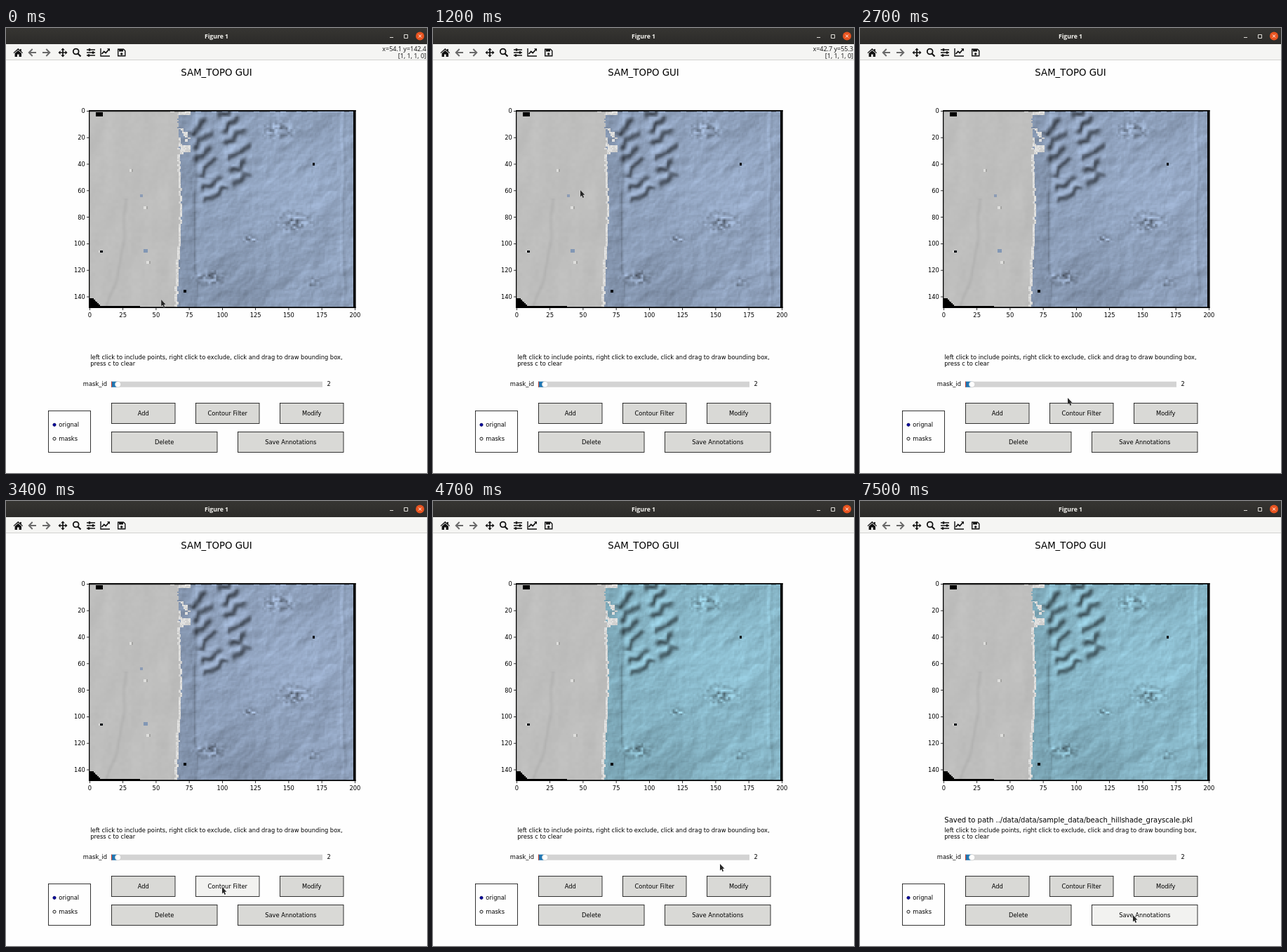
An HTML page with a canvas that plays this animation: 600x634 px, repeating every 8000 ms.

```html
<!DOCTYPE html>
<html lang="en">
<head>
<meta charset="utf-8">
<title>Figure 1</title>
<style>
  html, body { margin: 0; width: 100%; height: 100%; overflow: hidden; background: #fefefe; }
  canvas { display: block; }
</style>
</head>
<body>
<canvas id="stage" width="600" height="634"></canvas>
<script>
const LOOP = 8000, STEP = 100, FILTERED_AT = 3500, SAVED_AT = 7500;
const MAP = { x: 119, y: 118, w: 378, h: 280, cols: 200, rows: 148, scale: 1.89 };
const PLOT = '"DejaVu Sans", sans-serif', SYSTEM = '"Open Sans", sans-serif';
const BUTTON_ROWS = [['Add', 'Contour Filter', 'Modify'], ['Delete', 'Save Annotations']];

// pointer moves: start time, end time, destination
const HOME = [221.2, 387.1];
const MOVES = [
  [0, 500, 174, 290], [500, 1100, 199.7, 222.5], [1100, 1200, 210, 231],
  [1200, 1600, 156, 326], [1600, 1800, 172, 305], [1800, 2300, 238.5, 411],
  [2400, 2900, 307, 549], [3200, 3400, 308, 550], [4400, 4700, 409, 517], [5700, 6200, 389, 590]
];

// ---- terrain ----
const bump = d => Math.exp(-d * d);

function hash(x, y) {
  const s = Math.sin(x * 127.1 + y * 311.7) * 43758.5453;
  return s - Math.floor(s);
}
function noise(x, y) {
  const i = Math.floor(x), j = Math.floor(y), ease = v => v * v * (3 - 2 * v);
  const u = ease(x - i), v = ease(y - j), mix = (a, b, k) => a + (b - a) * k;
  return mix(mix(hash(i, j), hash(i + 1, j), u), mix(hash(i, j + 1), hash(i + 1, j + 1), u), v);
}
function height(x, y) {
  const across = x + y, along = x - y;
  return .9 * noise(across * .035, along * .025) + .5 * noise(across * .1 + 9, along * .07)
    + .4 * noise(x * .16, y * .2) + .2 * noise(x * .36, y * .4) + .1 * noise(x * .7, y * .7);
}
// parallel strokes stepping down the slope, in two columns
function gullyShade(x, y) {
  let shade = 0;
  for (let row = 0; row < 6; row++) for (let col = 0; col < 2; col++) {
    const dx = x - (77 + 2.2 * row + 22 * col), dy = y - (15 + 10.5 * row - 12 * col);
    const along = dx * .8 - dy * .6, length = 10 + 9 * hash(row, col + 4);
    const side = dx * .6 + dy * .8 + 5 * (noise(along * .2, row * 7 + col) - .5);
    const past = Math.max(-along, along - length, 0);
    const width = 1.6 + hash(row + 2, col);
    shade += bump(past / 3) * (.12 * bump((side + 4) / 3) - .5 * bump(side / width));
  }
  return shade;
}
function roughShade(x, y) {
  let shade = 0;
  for (const [cx, cy, r] of [[154, 83, 9], [143, 14, 8], [121, 96, 4], [168, 129, 4], [90, 125, 7]])
    shade += bump(Math.hypot((x - cx) / 1.4, (y - cy) * 1.3) / r) * .8 * (noise(x * .5, y * .55) - .58);
  return shade;
}
function hillShade(x, y) {
  const wander = 2 * noise(y * .06, 5);
  let s = 1 + .5 * (height(x + 1, y + 1) - height(x, y)) + gullyShade(x, y) + roughShade(x, y);
  s += .07 * bump(Math.hypot(x - 155, (y - 60) * 1.3) / 38) - .1 * bump(Math.hypot(x - 112, y - 138) / 26);
  if (x < 80) s -= .07;
  if (y > 25) s -= .12 * bump(x - 79 - wander);
  s += .06 * bump(x - 189 - wander) - .07 * bump(x - 191 - wander);
  return Math.max(.1, Math.min(1.22, s));
}
function sandShade(x, y) {
  const slope = noise((x + 1) * .1, (y + 1) * .05) - noise(x * .1, y * .05);
  const streak = x + 8 * noise(y * .04, 3) - (148 - y) * .18;
  return 1 + .2 * slope + .02 * (noise(x * .4, y * .4) - .5) - .05 * bump((streak - 17) / 1.4) * (y > 65);
}
function renderTerrain(tint, specks) {
  const layer = document.createElement('canvas');
  layer.width = MAP.cols; layer.height = MAP.rows;
  const g = layer.getContext('2d'), image = g.createImageData(MAP.cols, MAP.rows);
  for (let y = 0, k = 0; y < MAP.rows; y++) for (let x = 0; x < MAP.cols; x++, k += 4) {
    const edge = Math.round(66 + 3.7 * bump((y - 70) / 45) + .8 * (hash(3, y >> 1) - .5));
    const mottled = y < 33 && x < 76 && (y < 3 || (y > 12 && noise(x * .4, y * .5) > .58 + (x - 70) * .04));
    const inMask = x >= edge && !mottled;
    const color = inMask ? tint : [190, 190, 189];
    const rim = mottled ? x >= edge : x >= edge - 2 && y > 25;
    let s = inMask ? hillShade(x, y) : rim ? 1.08 + .13 * hash(x, y) : sandShade(x, y);
    if (y === 0) s *= x > 60 && hash(x >> 2, 1) > .45 ? 1.15 : .8;
    for (let c = 0; c < 3; c++) image.data[k + c] = color[c] * s;
    image.data[k + 3] = 255;
  }
  g.putImageData(image, 0, 0);
  const block = (fill, ...rect) => { g.fillStyle = fill; g.fillRect(...rect); };
  block('#000', 5, 1, 5, 3);
  for (let i = 0; i < 7; i++) block('#000', 0, 141 + i, 3 + i, 1);
  block('#000', 0, 147, 38, 1);
  block('#000', 199, 0, 1, 148);
  for (const [x, y] of [[30, 44], [41, 72], [43, 113], [7, 105]]) {
    block('#a4a4a2', x + 1, y, 2, 2);
    block('#dededc', x, y, 2, 2);
  }
  for (const [x, y] of [[168, 39], [71, 135], [8, 105]]) block('#0a0f14', x, y, 2, 2);
  if (specks) {
    block('#8297b5', 41, 104, 3, 3);
    block('#8c9cb5', 38, 63, 2, 2);
  }
  return layer;
}
const terrain = renderTerrain([142, 160, 187], true);
const filteredTerrain = renderTerrain([134, 180, 197], false);

// ---- drawing helpers ----
const ctx = document.getElementById('stage').getContext('2d');

function text(str, x, y, size = 8.33, align = 'left', color = '#000', family = PLOT, weight = 400) {
  ctx.font = `${weight} ${size}px ${family}`;
  ctx.textAlign = align;
  ctx.fillStyle = color;
  ctx.fillText(str, x, y);
}
function rect(color, x, y, w, h) { ctx.fillStyle = color; ctx.fillRect(x, y, w, h); }
function box(fill, x, y, w, h) {
  rect(fill, x, y, w, h);
  ctx.strokeStyle = '#111'; ctx.lineWidth = .85;
  ctx.strokeRect(x, y, w, h);
}
function stroke(path, color, width) {
  ctx.strokeStyle = color; ctx.lineWidth = width;
  ctx.stroke(new Path2D(path));
}
function fill(path, color) { ctx.fillStyle = color; ctx.fill(new Path2D(path)); }
function circle(x, y, r, color, border, width = 1) {
  ctx.beginPath(); ctx.arc(x, y, r, 0, 7);
  if (color) { ctx.fillStyle = color; ctx.fill(); }
  if (border) { ctx.strokeStyle = border; ctx.lineWidth = width; ctx.stroke(); }
}

function drawWindow() {
  rect('#fefefe', 0, 0, 600, 634);
  const bar = ctx.createLinearGradient(0, 0, 0, 23);
  bar.addColorStop(0, '#363532'); bar.addColorStop(1, '#2c2b29');
  rect(bar, 0, 0, 600, 23);
  text('Figure 1', 300, 15.3, 8.7, 'center', '#f4f3ef', SYSTEM, 700);
  stroke('M547 13.5h5M567.5 9.5h5v5h-5z', '#dedcd7', 1);
  circle(590, 11.5, 6, '#e95420');
  stroke('M588 9.5l4 4m0-4l-4 4', '#fff', 1);
  rect('#f5f5f3', 0, 23, 600, 22);
  rect('#d2d2cf', 0, 45, 600, 1);
}
function drawToolbar() {
  const ink = '#111', grey = '#696969';
  fill('M10.5 35.2L17.3 29l6.8 6.2-.8.9-6-5.1-6 5.1zM12.6 36l4.7-4 4.7 4v5h-3.4v-3.5H16V41h-3.4zM20 30h1.8v3H20z', ink);
  stroke('M43 35H33m4.7-5l-5 5 5 5', grey, 1.9);
  stroke('M52 35h10m-4.7-5l5 5-5 5', grey, 1.9);
  stroke('M76 35h10M81 30v10', ink, 1.7);
  fill('M74.5 35l3-2.8v5.6zM87.5 35l-3-2.8v5.6zM81 28.5l-2.8 3h5.6zM81 41.5l-2.8-3h5.6z', ink);
  circle(99.7, 33.5, 3.9, null, ink, 1.8);
  stroke('M102.5 36.5l4 4', ink, 2.2);
  stroke('M115 31h12M115 35h12M115 39h12', ink, 1.3);
  stroke('M119 29.3v3.4M124 33.3v3.4M118 37.3v3.4', ink, 2.4);
  stroke('M135 29v11h13', ink, 1.4);
  stroke('M136.5 37l3.2-3.5 2.5 2 4.5-5', ink, 1.8);
  fill('M144 29.2h4v4z', ink);
  stroke('M159.7 30.2h7.8l2.3 2.3v7.3h-10.1z', ink, 1.4);
  fill('M161 30h6v3.5h-6z', ink);
  circle(164.7, 37, 1.7, ink);
}
function drawPlot(filtered) {
  text('SAM_TOPO GUI', 300, 67.8, 13.33, 'center');
  ctx.imageSmoothingEnabled = false;
  ctx.drawImage(filtered ? filteredTerrain : terrain, MAP.x, MAP.y, MAP.w, MAP.h);
  rect('#000', 118, 117, 380.5, 1.8);
  rect('#000', 118, 117, 1.3, 282);
  rect('#000', 495, 117, 3.6, 282);
  rect('#000', 118, 397.3, 380.5, 1.7);
  for (let value = 0; value <= 200; value += 25) {
    const x = MAP.x + .4 + value * MAP.scale;
    rect('#000', x - .4, 399, .8, 3);
    text(value, x, 411.5, 8.33, 'center');
  }
  for (let value = 0; value <= 140; value += 20) {
    const y = MAP.y + .4 + value * MAP.scale;
    rect('#000', 115, y - .4, 3, .8);
    text(value, 112.8, y + 3, 8.33, 'right');
  }
}
function drawButtons(px, py) {
  BUTTON_ROWS.forEach((labels, row) => labels.forEach((label, col) => {
    const pitch = 360 / labels.length, w = pitch - 29.5, h = 29;
    const x = 150.5 + col * pitch, y = 534.5 + row * 41;
    const hover = px >= x && px <= x + w && py >= y && py <= y + h;
    box(hover ? '#f2f2f0' : '#d9d9d6', x, y, w, h);
    text(label, x + w / 2, y + 17, 8.33, 'center');
  }));
}
function drawControls() {
  text('left click to include points, right click to exclude, click and drag to draw bounding box,', 120.3, 471.8);
  text('press c to clear', 120.3, 481.3);
  text('mask_id', 144, 510.2, 8.33, 'right');
  rect('#d3d3d3', 150, 503.7, 301, 8);
  rect('#1f77b4', 150, 503.7, 9.5, 8);
  rect('#c8402c', 150, 503.7, 1, 8);
  circle(159.6, 507.8, 4.2, '#fff', '#c4c4c4', .7);
  text('2', 457.5, 510.2);
  box('#fefefe', 60.5, 545.5, 60, 59);
  circle(69, 565.3, 2.1, '#0000a8', '#000050', .8);
  circle(69, 585.2, 2.1, null, '#000', .9);
  text('orignal', 75.3, 568.2);
  text('masks', 75.3, 588);
}

function pointerAt(t) {
  let [x, y] = HOME;
  for (const [start, end, toX, toY] of MOVES) {
    const left = 1 - Math.max(0, Math.min(1, (t - start) / (end - start)));
    const eased = 1 - left * left;
    x += (toX - x) * eased;
    y += (toY - y) * eased;
  }
  return [x, y];
}
function drawReadout(t) {
  // the readout trails the pointer by one step
  const [x, y] = pointerAt(Math.max(0, t - STEP));
  if (y > MAP.y + MAP.h) return;
  const dataX = ((x - MAP.x) / MAP.scale).toFixed(1), dataY = ((y - MAP.y) / MAP.scale).toFixed(1);
  text(`x=${dataX} y=${dataY}`, 599, 32.8, 9, 'right', '#111', SYSTEM, 500);
  text('[1, 1, 1, 0]', 599, 43.4, 9, 'right', '#111', SYSTEM, 500);
}
function drawPointer(x, y) {
  ctx.save();
  ctx.translate(x, y);
  ctx.scale(.85, .9);
  const arrow = 'M0 0V10.5L2.4 8.3 4.2 12.2 6 11.4 4.3 7.6H7.6z';
  stroke(arrow, 'rgba(255,255,255,.6)', 1);
  fill(arrow, '#262626');
  ctx.restore();
}

function render(now) {
  const t = Math.floor((now % LOOP) / STEP) * STEP;
  const [px, py] = pointerAt(t);
  drawWindow();
  drawToolbar();
  drawReadout(t);
  drawPlot(t >= FILTERED_AT);
  drawControls();
  drawButtons(px, py);
  if (t >= SAVED_AT) text('Saved to path ../data/data/sample_data/beach_hillshade_grayscale.pkl', 120.3, 457.8, 10);
  drawPointer(px, py);
}
const start = performance.now();
function tick() {
  render(performance.now() - start);
  requestAnimationFrame(tick);
}
tick();
</script>
</body>
</html>
```
